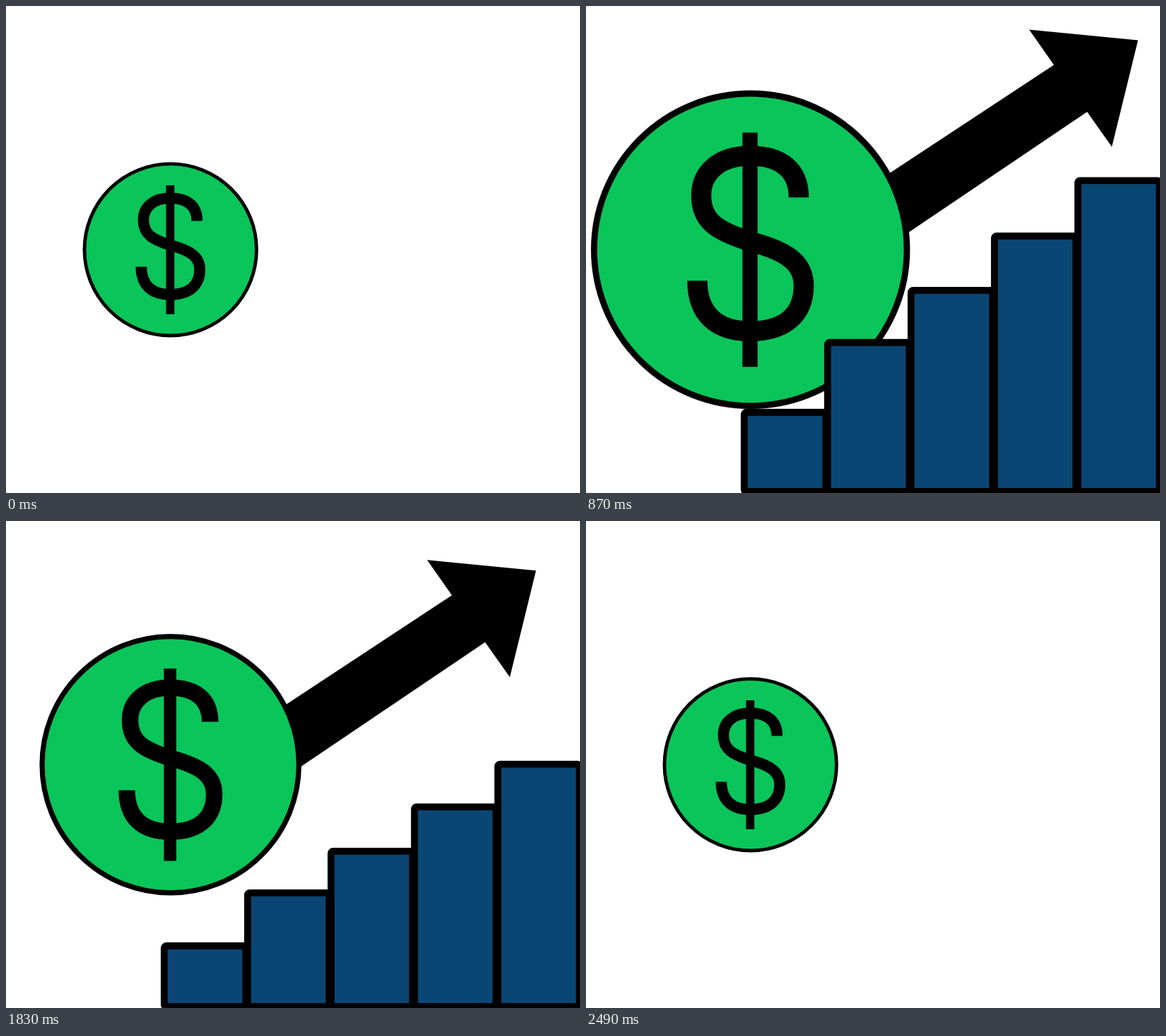
An HTML page with a canvas that plays this animation: 812 by 690 pixels, repeating every 2.7 s.

```html
<!DOCTYPE html>
<html lang="en">
<head>
<meta charset="utf-8">
<title>Growth chart</title>
<style>
  html, body { margin: 0; width: 100%; height: 100%; overflow: hidden; background: #fff; }
  canvas { display: block; }
</style>
</head>
<body>
<canvas id="stage" width="812" height="690"></canvas>
<script>
const ctx = document.getElementById('stage').getContext('2d');
const LOOP = 2700, STEP = 30;
const GREEN = '#0ac55a', BLUE = '#0a4674', BLACK = '#000';
const CENTER = [232.7, 345.3];

const PEAK_HEIGHTS = [119.8, 219, 292.3, 368.2, 446.6];
const REST_HEIGHTS = [116, 214, 291, 373, 452];
const MIN_HEIGHT = 17.3;

const ARROW_HIDDEN = [402, 312], ARROW_PEAK = [807, 30], ARROW_REST = [766, 59];

// Outline relative to the tip, from the upper to the lower notch.
const arrowHead = [[-119, 35], [-154, -15], [0, 0], [-37, 151], [-72, 101.5]];

const dollar = new Path2D(
  'M69-74C69-113 44-133 0-133C-44-133-69-109-69-77C-69-41-48-27-1-12' +
  'C52 2 76 18 76 51C76 91 50 115.5 0 115.5C-48 115.5-74.5 91-74.5 44');

const lerp = (a, b, k) => a + (b - a) * k;
const mix = (p, q, k) => p.map((v, i) => lerp(v, q[i], k));
const progress = (t, from, to) => Math.min(1, Math.max(0, (t - from) / (to - from)));
const ease = (t, from, to) => (1 - Math.cos(Math.PI * progress(t, from, to))) / 2;
const easeOut = (t, from, to) => 1 - (1 - progress(t, from, to)) ** 3;

function scaleAtCenter(scale) {
  ctx.translate(...CENTER);
  ctx.scale(scale, scale);
}

function drawArrow(t) {
  const out = ease(t, 195, 570) - ease(t, 1775, 2181);
  if (out <= 0) return;
  const goal = mix(ARROW_PEAK, ARROW_REST, ease(t, 570, 1080));
  const [x, y] = mix(ARROW_HIDDEN, goal, out);
  const points = arrowHead.map(([dx, dy]) => [x + dx, y + dy]);
  // The shaft runs from each notch down to a fixed x under the coin.
  const shaftEnd = ([px, py], endX, slope) => [endX, py + (px - endX) * slope];
  points.push(shaftEnd(points[4], 300, 0.676), shaftEnd(points[0], 250, 0.66));
  ctx.save();
  scaleAtCenter(Math.min(1, out / 0.3));
  ctx.translate(-CENTER[0], -CENTER[1]);
  ctx.beginPath();
  points.forEach(p => ctx.lineTo(...p));
  ctx.fillStyle = BLACK;
  ctx.fill();
  ctx.restore();
}

function drawCoin(t) {
  ctx.save();
  scaleAtCenter(0.55 + 0.45 * (easeOut(t, 0, 919) - ease(t, 1338, 2470)));
  ctx.beginPath();
  ctx.arc(0, 0, 221.3, 0, 2 * Math.PI);
  ctx.fillStyle = GREEN;
  ctx.fill();
  ctx.lineWidth = 8.8;
  ctx.stroke();
  ctx.translate(-0.7, 0);
  ctx.lineWidth = 28.5;
  ctx.stroke(dollar);
  ctx.fillStyle = BLACK;
  ctx.fillRect(-10.7, -166, 21.4, 332);
  ctx.restore();
}

function drawBars(t) {
  const grow = ease(t, 0, 468) - ease(t, 1560, 2400);
  if (grow <= 0.002) return;
  const settle = ease(t, 780, 1110);
  ctx.lineWidth = 9.8;
  ctx.fillStyle = BLUE;
  REST_HEIGHTS.forEach((rest, i) => {
    const full = lerp(PEAK_HEIGHTS[i], rest, settle);
    const top = 690 - lerp(MIN_HEIGHT, full, grow) + 4.9;
    ctx.beginPath();
    ctx.roundRect(223.8 + 118 * i, top, 115.4, 688 - top, 3);
    ctx.fill();
    ctx.stroke();
  });
}

let start;
function frame(now) {
  start ??= now;
  const t = Math.floor((now - start) % LOOP / STEP) * STEP;
  ctx.fillStyle = '#fff';
  ctx.fillRect(0, 0, 812, 690);
  drawArrow(t);
  drawCoin(t);
  drawBars(t);
  requestAnimationFrame(frame);
}
requestAnimationFrame(frame);
</script>
</body>
</html>
```
